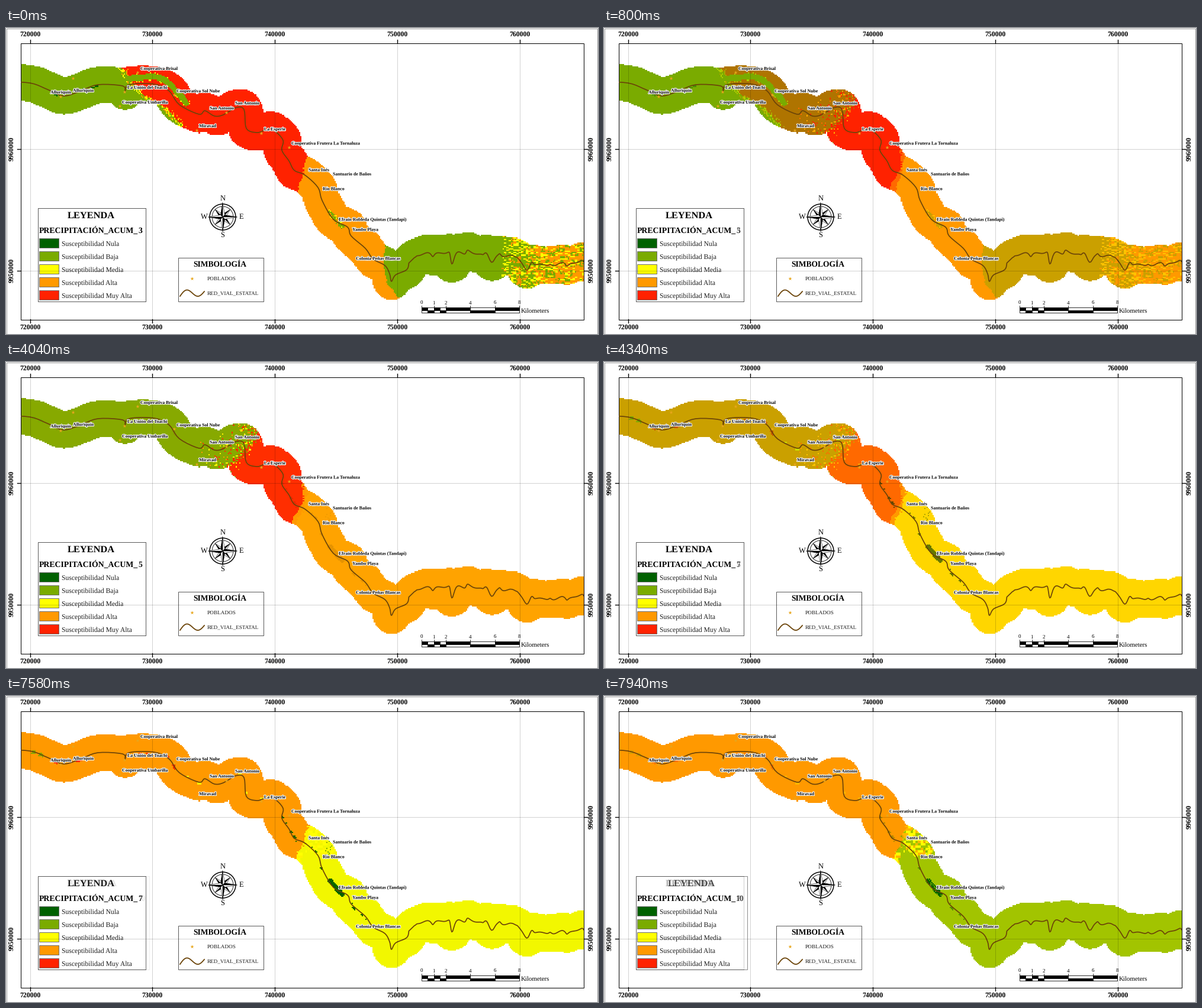
A matplotlib script for the animation above (8000 ms loop, 1000 px wide and 518 px high).

```python
import numpy as np
import matplotlib.pyplot as plt
from matplotlib.animation import FuncAnimation
from matplotlib.patches import Circle, PathPatch, Polygon, Rectangle
from matplotlib.path import Path
from matplotlib.textpath import TextPath
from matplotlib.transforms import Affine2D

plt.rcParams["text.hinting"] = "none"
W, H, DPI = 1000, 518, 100
PT = 72 / DPI
STEP, LOOP = 20, 8000
SERIF = "Liberation Serif"
BROWN, GREY, INK = "#6b4409", "#5a5a5a", "#1c1c1c"

NONE, LOW, MID, HIGH, TOP, BLANK = range(6)
RAMP = np.array([(0, 97, 0), (122, 171, 0), (255, 255, 0),
                 (255, 153, 0), (255, 34, 0), (255, 255, 255)], float)
rng = np.random.default_rng(7)


# ---- road: a smooth curve through key points, then winding bends
def smooth(pts, n=5):
    """Catmull-Rom curve through the points."""
    p = np.array(pts, float)
    p = np.vstack([2 * p[0] - p[1], p, 2 * p[-1] - p[-2]])
    u = np.linspace(0, 1, n, endpoint=False)[:, None]
    return np.vstack([
        b + .5 * u * (c - a + u * (2 * a - 5 * b + 4 * c - d + u * (3 * (b - c) + d - a)))
        for a, b, c, d in zip(p, p[1:], p[2:], p[3:])])


def bends():
    x = np.arange(688, 1012, 1.5)
    y = np.interp(x, [688, 765, 850, 888, 940, 985], [386, 379, 385, 400, 401, 394])
    for bend in (756, 820, 879):
        y += (19 - (bend - 756) / 14) * np.exp(-((x - bend) / 4) ** 2)
    y += 3 * np.sin(x / 3.3) * np.sin(x / 17) + 1.5 * np.sin(x / 6)
    return np.column_stack([x + 2.5 * np.sin(x / 4.5), y])


KEYS = [(-10, 91), (40, 93), (70, 104), (97, 115), (125, 107), (155, 96),
        (197, 98), (201, 107), (205, 97), (226, 94), (255, 96), (276, 107),
        (293, 130), (326, 146), (336, 140), (352, 149), (367, 147), (388, 135),
        (402, 138), (406, 170), (424, 177), (438, 173), (453, 174), (468, 190),
        (466, 207), (478, 225), (487, 241), (505, 249), (527, 270), (534, 292),
        (553, 324), (577, 337), (583, 352), (607, 373), (620, 391), (640, 402),
        (648, 416), (651, 429), (658, 418), (677, 409), (681, 395)]
ROAD = np.vstack([smooth(KEYS), bends()])

# ---- raster grid
CELL, REACH = 2.07, 31
ix = (np.arange(W) / CELL).astype(int)
iy = (np.arange(H) / CELL).astype(int)
X, Y = np.meshgrid((np.arange(ix[-1] + 1) + .5) * CELL,
                   (np.arange(iy[-1] + 1) + .5) * CELL)


def noise(h=1, w=1):
    """Uniform noise in clumps of h by w cells."""
    rows, cols = X.shape
    coarse = rng.random((rows // h + 1, cols // w + 1))
    return np.kron(coarse, np.ones((h, w)))[:rows, :cols]


def dist(pts):
    """Distance of every cell to a polyline."""
    best = np.full(X.shape, 1e9)
    for (x0, y0), (x1, y1) in zip(pts, pts[1:]):
        dx, dy = x1 - x0, y1 - y0
        u = np.clip(((X - x0) * dx + (Y - y0) * dy) / (dx * dx + dy * dy), 0, 1)
        best = np.minimum(best, (X - x0 - u * dx) ** 2 + (Y - y0 - u * dy) ** 2)
    return np.sqrt(best)


def past(edge, rough=.8):
    """Signed distance to the right of an edge given from top to bottom."""
    xs, ys = zip(*edge)
    return X - np.interp(Y, ys, xs) + rng.normal(0, rough, X.shape)


def roadside(zone, level, x0, x1, p, reach=3):
    near = (to_road < reach) & (X > x0) & (X < x1)
    zone[near & (noise(2, 3) < p)] = level


to_road = dist(ROAD)
corridor = to_road < REACH
grove = dist([(547, 312), (567, 335)])
strip = dist(smooth([(206, 85), (260, 84), (292, 112), (306, 130)]))
glade = np.hypot(X - 535, Y - 248) < 25


def zones_3():
    z = np.full(X.shape, LOW)
    d = past([(192, 60), (212, 92), (232, 114), (266, 132), (296, 163)])
    z[d > 0] = TOP
    r = noise()
    z[(abs(d + 2) < 5) & (r < .35)] = MID
    z[(abs(d) < 8) & (r > .85)] = HIGH
    z[(strip < 7) & (noise() < .15)] = MID
    z[strip < 5] = LOW
    roadside(z, NONE, 60, 180, .15)

    d = past([(509, 215), (503, 230), (502, 248), (490, 280)])
    z[d > 0] = HIGH
    z[(grove < 5) & (noise() < .3)] = MID
    z[(grove < 4) & (noise() < .7)] = LOW

    d = past([(642, 355), (637, 400), (643, 432), (664, 458)])
    z[(d > 0) & (X > 600)] = LOW
    r = .55 * noise(3, 4) + .45 * noise()
    far = X > 836 + 6 * noise()
    z[far & (r < np.interp(X, [838, 865, 976], [.1, .4, .75]))] = HIGH
    z[far & (noise(1, 2) < np.interp(X, [838, 976], [.28, .16]))] = MID
    return z


def zones_5():
    z = np.full(X.shape, LOW)
    d = past([(428, 104), (418, 135), (376, 180)], 3)
    z[d > 0] = TOP
    mix = noise() < np.where(d < 0, .5 * np.exp(d / 22), .3 * np.exp(-d / 6))
    mix &= (X > 312) & (X < 450)
    z[mix] = rng.choice([TOP, MID, HIGH, LOW], X.shape, p=[.4, .33, .12, .15])[mix]
    z[past([(501, 215), (502, 235), (481, 270)]) > 0] = HIGH
    return z


SPLIT = [(512, 215), (504, 235), (503, 250), (487, 275)]


def zones_7():
    z = np.full(X.shape, HIGH)
    z[past(SPLIT, 1.5) > 0] = MID
    roadside(z, LOW, 25, 65, .35)
    roadside(z, TOP, 75, 290, .12)
    roadside(z, MID, 300, 440, .08)
    roadside(z, NONE, 466, 620, .12)
    z[glade & (X > 538) & (noise() < .12)] = LOW
    z[grove < 4] = NONE
    return z


def zones_10():
    z = np.full(X.shape, HIGH)
    d = past(SPLIT, 1.5)
    z[d > 0] = LOW
    r = noise(2, 2)
    border = (d > 0) & (glade | (d < 12) & (Y < 285))
    z[border & (r < .35)] = MID
    z[border & (r > .65)] = HIGH
    z[(grove < 4) & (noise() < .8)] = NONE
    return z


maps = [RAMP[np.where(corridor, make(), BLANK)]
        for make in (zones_3, zones_5, zones_7, zones_10)]


def raster(i, f):
    small = np.rint(maps[i] * (1 - f) + maps[min(i + 1, 3)] * f).astype(np.uint8)
    full = small[iy][:, ix]
    full[:, :25] = full[:, 976:] = 255
    return full


# ---- sheet
fig = plt.figure(figsize=(W / DPI, H / DPI), dpi=DPI, facecolor="white")
picture = fig.figimage(raster(0, 0), 0, 0, origin="upper", zorder=-1)
ax = fig.add_axes([0, 0, 1, 1])
ax.set(xlim=(0, W), ylim=(H, 0))
ax.axis("off")


def line(pts, color="black", px=1.0, **kw):
    return ax.plot(*zip(*pts), color=color, lw=px * PT, **kw)[0]


def text(x, y, s, px, bold=False, **kw):
    return ax.text(x, y, s, fontsize=px * PT, family=SERIF,
                   weight="bold" if bold else "normal", **kw)


def box(x0, y0, x1, y1, fill="none", edge="black", px=1.0):
    ax.add_patch(Rectangle((x0, y0), x1 - x0, y1 - y0, fc=fill, ec=edge, lw=px * PT))


box(.5, .5, W - 1.5, H - .5, edge="#9a9a9a")
line(ROAD, BROWN, 1.7, solid_joinstyle="round").set_clip_path(
    Rectangle((25, 25), 951, 468, transform=ax.transData))

mid = dict(ha="center", va="center")
for k in range(5):
    x = 40.5 + 206.9 * k
    line([(x, 25), (x, 493)], "#00000038", .8)
    for y, out, label in ((25, 20, 12), (493, 499, 508)):
        line([(x, y), (x, out)], px=1.4)
        text(x, label, str(720000 + 10000 * k), 11.7, True, **mid)
for k in range(2):
    y = 204.5 + 206 * k
    line([(25, y), (976, y)], "#00000038", .8)
    for x, out, label in ((25, 19, 10.5), (976, 982, 990)):
        line([(x, y), (out, y)], px=1.4)
        text(label, y, str(9960000 - 10000 * k), 11.7, True, rotation=90, **mid)
box(24.5, 25.5, 975.5, 493.5)

STARS = [(92, 116), (113, 85), (222, 75), (200, 108), (192, 132), (284, 113),
         (372, 143), (322, 173), (431, 178), (478, 202), (314, 424)]
ax.scatter(*zip(*STARS), marker="*", s=22, color="#e8a61c", lw=0, zorder=3)

LABELS = [
    (75, 111, "Alluriquín"), (113, 108, "Alluriquín"),
    (227, 71, "Cooperativa Brisal"), (205, 103, "La Unión del Toachi"),
    (288, 109, "Cooperativa Sol Nube"), (196, 128, "Cooperativa Umbarilla"),
    (344, 138, "San Antonio"), (387, 129.5, "San Antonio"), (326, 168, "Miravad"),
    (436, 173.5, "La Esperie"), (482, 197.5, "Cooperativa Frutera La Tornaluza"),
    (511, 242.5, "Santa Inés"), (552, 249.5, "Santuario de Baños"),
    (535, 274.5, "Río Blanco"), (562, 326.5, "Efraín Robleda Quintas (Tandapi)"),
    (585, 343.5, "Yambo Playa"), (591, 392.5, "Colonia Peñas Blancas")]
glyphs = Path.make_compound_path(*[
    TextPath((0, 0), s, size=7.8, prop={"family": SERIF, "weight": "bold"})
    .transformed(Affine2D().scale(1, -1).translate(x, y)) for x, y, s in LABELS])
ax.add_patch(PathPatch(glyphs, fc="white", ec="white", lw=2.2 * PT,
                       joinstyle="round", zorder=4))
ax.add_patch(PathPatch(glyphs, fc="black", lw=0, zorder=5))

# ---- legend
line([(235.5, 304.5), (53.5, 304.5), (53.5, 463), (235.5, 463)], GREY)
narrow = [line([(235.5, 304.5), (235.5, 463)], GREY),
          text(144, 321.5, "LEYENDA", 16.4, True, ha="center")]
wide = [line([(235.5, 304.5), (242, 304.5), (242, 463), (235.5, 463)], GREY),
        text(147.5, 321.5, "LEYENDA", 16.4, True, ha="center")]
prefix = text(56, 347, "PRECIPITACIÓN_ACUM_", 13.8, True)
end = prefix.get_window_extent().x1
counts = [text(end, 347, n, 13.8, True) for n in ("3", "5", "7", "10")]
for k, name in enumerate(("Nula", "Baja", "Media", "Alta", "Muy Alta")):
    y = 356 + 22.1 * k
    box(55.5, y, 88.5, y + 16, fill=RAMP[k] / 255, edge="#6e6e6e")
    text(94, y + 12.2, "Susceptibilidad " + name, 11.6, color=INK)

box(290.5, 388.5, 434.5, 463, edge=GREY)
text(361.5, 404, "SIMBOLOGÍA", 13.5, True, ha="center")
text(340, 427.5, "POBLADOS", 9.3, color=INK)
text(340, 452.5, "RED_VIAL_ESTATAL", 9.2, color=INK)
u = np.linspace(0, 1, 40)
line(list(zip(294 + 41 * u, 450 - 4 * u - 7 * np.sin(2 * np.pi * u) + 4 * (1 - u) ** 3)),
     BROWN, 1.8)

# ---- compass rose
CX, CY = 366, 320
for r, px in ((22, 1.5), (18, .8)):
    ax.add_patch(Circle((CX, CY), r, fc="none", ec="black", lw=px * PT))


def polar(r, deg):
    a = np.radians(deg)
    return CX + r * np.sin(a), CY - r * np.cos(a)


for start, size in ((45, 18), (0, 24.5)):
    for deg in range(start, 360, 90):
        for side, fill in ((-1, "black"), (1, "white")):
            ax.add_patch(Polygon([(CX, CY), polar(size, deg),
                                  polar(5, deg + side * 45)],
                                 fc=fill, ec="black", lw=.5 * PT, zorder=2))
for k, s in enumerate("NESW"):
    text(*polar(31, 90 * k), s, 12.5, **mid)

# ---- scale bar
KM = 20.62
stops = [0, .5, 1, 1.5, 2, 4, 6, 8]
for k, (a, b) in enumerate(zip(stops, stops[1:])):
    for row in range(2):
        box(702 + a * KM, 473 + 4.5 * row, 702 + b * KM, 477.5 + 4.5 * row,
            fill="black" if (k + row) % 2 == 0 else "white", px=.8)
for km in (0, 1, 2, 4, 6, 8):
    x = 702 + km * KM
    line([(x, 470), (x, 473)], px=.8)
    text(x, 468, str(km), 9, ha="center")
text(870, 482, "Kilometers", 10.9)

# ---- stepped cross-fades between the four maps
FADES = (500, 4040, 7580)


def phase(t):
    for i in (2, 1, 0):
        if t >= FADES[i]:
            return i, min((t - FADES[i]) // 60 + 1, 10) / 10
    return 0, 0.0


def update(n):
    i, f = phase(n * STEP)
    picture.set_data(raster(i, f))
    for k, label in enumerate(counts):
        label.set_alpha(1 - f if k == i else f if k == i + 1 else 0)
    w = f if i == 2 else 0
    for a in narrow:
        a.set_alpha(1 - w)
    for a in wide:
        a.set_alpha(w)
    return [picture, *counts, *narrow, *wide]


anim = FuncAnimation(fig, update, frames=LOOP // STEP, interval=STEP,
                     repeat=True, repeat_delay=0, blit=False)
plt.show()
```
